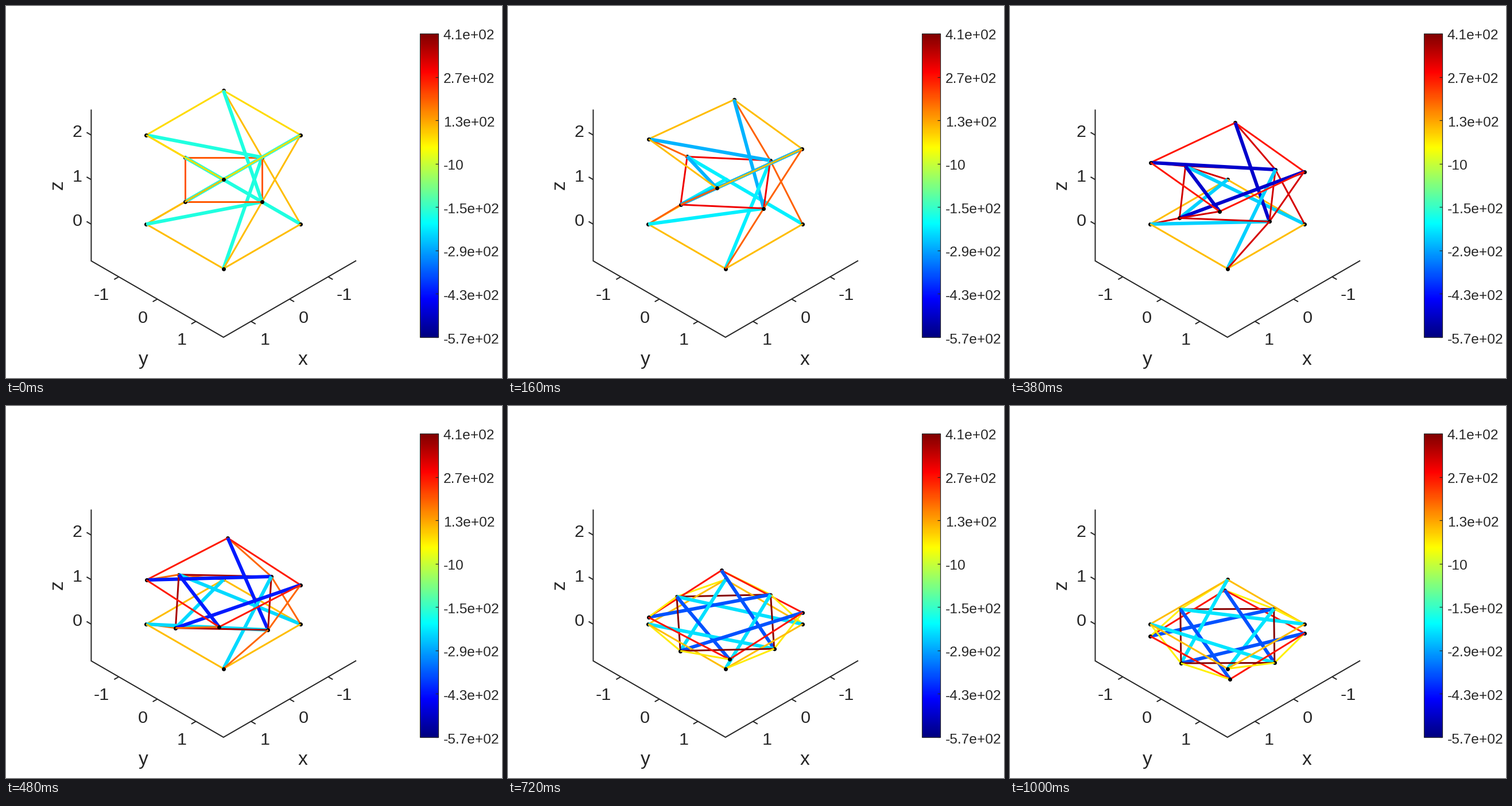
These frames come from a looping animation (864 px wide and 648 px high, 1.02 s). A matplotlib script:

```python
import numpy as np
import matplotlib.pyplot as plt
from matplotlib.animation import FuncAnimation

W, H, DPI = 864, 648, 100
FRAMES, STEP = 51, 20
PT = 72 / DPI
INK = (0.15, 0.15, 0.15)
CENTER = np.array([378.8, 380.0])
UX, UY, UZ = np.array([[-67.2, 38.8], [67.2, 38.8], [0, -77.6]])

plt.rcParams["font.family"] = "Liberation Sans"
fig = plt.figure(figsize=(W / DPI, H / DPI), dpi=DPI, facecolor="white")
ax = fig.add_axes([0, 0, 1, 1])
ax.axis("off")


def jet(u):
    u = np.asarray(u, float)
    return np.clip([1.5 - abs(4 * u - c) for c in (3, 2, 1)], 0, 1).T


def project(p):
    return CENTER + np.asarray(p, float) @ np.array([UX, UY, UZ])


def segment(a, b, width=2.0, color=INK, z=-50):
    return ax.plot([a[0], b[0]], [a[1], b[1]], color=color, lw=width * PT,
                   solid_capstyle="butt", zorder=z)[0]


def label(x, y, s, size, ha="center", **kw):
    ax.text(x, y, s, fontsize=size * PT, color=INK, ha=ha,
            va=kw.pop("va", "baseline"), **kw)


# Axes box
L, Z0, Z1 = 1.714, -0.825, 2.56
corners = project([[L, -L, Z1], [L, -L, Z0], [L, L, Z0], [-L, L, Z0]])
ax.plot(*corners.T, color=INK, lw=2 * PT, solid_joinstyle="miter", zorder=-50)
for v in (-1, 0, 1):
    for p, d in (((L, v, Z0), (-8, 4.6)), ((v, L, Z0), (8, 4.6)),
                 ((L, -L, v + 1), (-8, -4.6))):
        q = project(p)
        segment(q, q + d)
    shift = -4 if v < 0 else 0
    label(238 + 68 * v + shift, 551.5 + 39 * v, str(v), 30.5)
    label(518 - 67 * v - shift, 551.5 + 39 * v, str(v), 30.5)
    label(132.5, 305.5 - 77.6 * v, str(v + 1), 30.5, ha="right")
label(239.5, 625, "y", 33.5)
label(517, 625, "x", 33.5)
label(90, 312, "z", 33.5, rotation=90, va="center")

# Colour bar
X0, X1, TOP, BOTTOM = 721, 752.5, 48, 577
ax.imshow(jet(np.linspace(1, 0, 256))[:, None, :], extent=(X0, X1, BOTTOM, TOP),
          aspect="auto", interpolation="nearest", zorder=-60)
ax.add_patch(plt.Rectangle((X0, TOP), X1 - X0, BOTTOM - TOP, fill=False,
                           ec=INK, lw=1.2 * PT, zorder=-40))
for i in range(8):
    y = TOP + (BOTTOM - TOP) * i / 7
    v = 410 - 140 * i
    segment((X1 - 5, y), (X1, y), 1.2, z=-40)
    label(762, y + 10.5, f"{v:.1e}" if abs(v) >= 100 else str(v), 24.5, ha="left")

ax.set_xlim(0, W)
ax.set_ylim(H, 0)

# Motion of the rings
T = np.array([0, 160, 380, 580, 720, 860, 1000.0])
TOP_Z = [2, 1.80, 1.28, 0.586, 0.207, -0.052, -0.238]
TOP_ROT = [0, -6.4, -5.8, -0.2, 3.0, 3.1, 1.9]
MID_Z = [1, 0.934, 0.68, 0.287, 0.032, -0.153, -0.267]
MID_ROT = [0, -4.5, -3.8, 0, 2.2, 1.7, 0.4]
MID_R = [1, 1.08, 1.168, 1.219, 1.217, 1.214, 1.212]

# Stress of each member group as a colour map position
STRESS = {
    "top bar": [0.405, 0.30, 0.075, 0.225, 0.205, 0.185, 0.205],
    "low bar": [0.405, 0.36, 0.33, 0.345, 0.345, 0.36, 0.35],
    "mid ring": [0.79, 0.89, 0.92, 1.0, 0.995, 1.0, 0.995],
    "top ring": [0.66, 0.69, 0.855, 0.845, 0.855, 0.87, 0.855],
    "low ring": [0.69] * 7,
    "diagonal": [0.69, 0.78, 0.915, 0.635, 0.645, 0.63, 0.64],
}


def smooth(t, v):
    """Cubic Hermite curve through the key values."""
    v = np.array(v, float)
    m = np.gradient(v, T, edge_order=2)
    i = min(np.searchsorted(T, t, side="right") - 1, len(T) - 2)
    h = T[i + 1] - T[i]
    s = (t - T[i]) / h
    return ((2 * s**3 - 3 * s**2 + 1) * v[i] + (s**3 - 2 * s**2 + s) * h * m[i]
            + (3 * s**2 - 2 * s**3) * v[i + 1] + (s**3 - s**2) * h * m[i + 1])


def ring(radius, start, z):
    a = np.radians(start + 90 * np.arange(4))
    return np.c_[radius * np.cos(a), radius * np.sin(a), np.full(4, z)]


# Nodes 0-3 are the base, 4-7 the middle, 8-11 the top
LOW, MID, UP = 0, 4, 8
members = []
for k in range(4):
    n1, n2, n3 = (k + 1) % 4, (k + 2) % 4, (k + 3) % 4
    members += [
        ("low ring", LOW + k, LOW + n1), ("mid ring", MID + k, MID + n1),
        ("top ring", UP + k, UP + n1), ("diagonal", UP + k, MID + k),
        ("diagonal", LOW + k, MID + n1), ("low bar", LOW + k, MID + n2),
        ("top bar", UP + k, MID + n3),
    ]
lines = [segment((0, 0), (0, 0), 6 if "bar" in g else 3) for g, _, _ in members]
dots = [ax.plot([], [], "o", color="black", ms=7 * PT, mew=0)[0] for _ in range(12)]


def draw(i):
    t = i * STEP
    nodes = np.vstack([
        ring(np.sqrt(2), -45, 0),
        ring(smooth(t, MID_R), -90 + smooth(t, MID_ROT), smooth(t, MID_Z)),
        ring(np.sqrt(2), -45 + smooth(t, TOP_ROT), smooth(t, TOP_Z)),
    ])
    flat, depth = project(nodes), nodes.sum(axis=1)
    colors = {g: jet(np.interp(t, T, v)) for g, v in STRESS.items()}
    for line, (g, a, b) in zip(lines, members):
        line.set_data(flat[[a, b], 0], flat[[a, b], 1])
        line.set_color(colors[g])
        line.set_zorder(10 + (depth[a] + depth[b]) / 2)
    for dot, p, d in zip(dots, flat, depth):
        dot.set_data([p[0]], [p[1]])
        dot.set_zorder(10 + d)
    return lines + dots


anim = FuncAnimation(fig, draw, frames=FRAMES, interval=STEP, repeat=True,
                     repeat_delay=0, blit=False)
plt.show()
```
